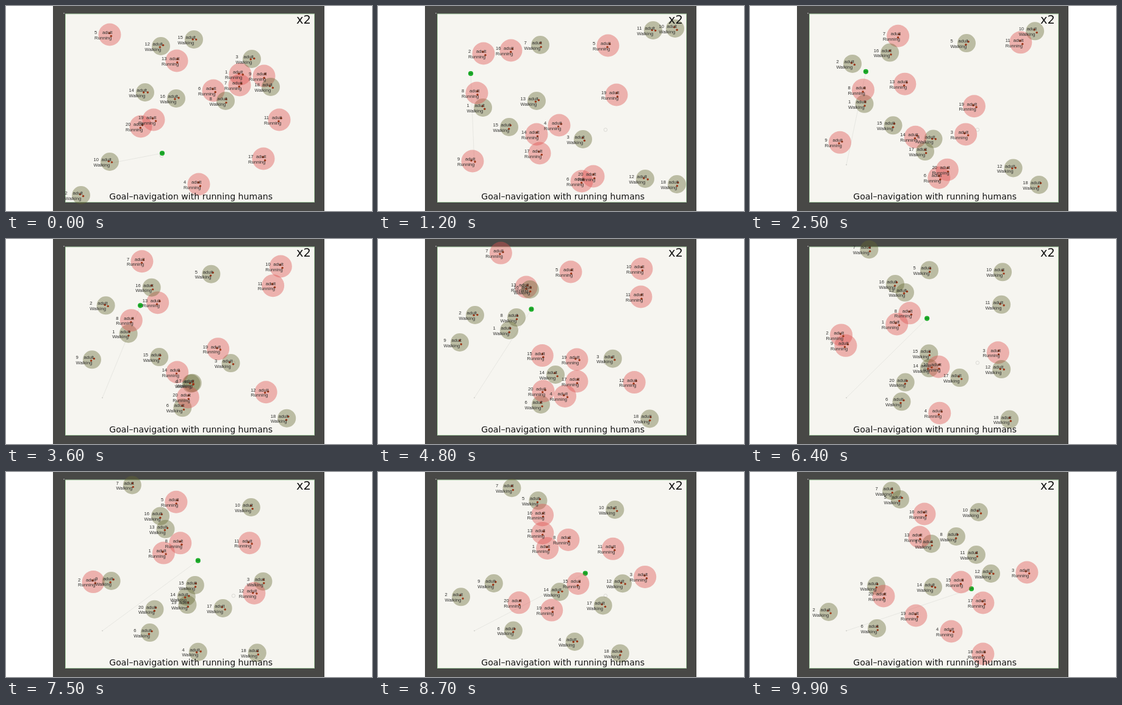
These frames come from a looping animation (600 px wide and 337 px high, 10000 ms). An HTML page with a canvas:

```html
<!DOCTYPE html>
<html lang="en">
<head>
<meta charset="utf-8">
<title>Goal-navigation with running humans</title>
<style>
html, body { margin: 0; width: 100%; height: 100%; overflow: hidden; background: #fff; }
canvas { display: block; width: 600px; height: 337px; }
</style>
</head>
<body>
<canvas id="stage"></canvas>
<script>
const W = 600, H = 337, LOOP = 10000, STEP = 100;
const CUT = 300; // the second run begins here
const BEGIN = 1200, MIDDLE = 4800, END = 9900;
const MOODS = [BEGIN, 2500, MIDDLE, 6400, 7500, END];
const HOME = { x: 158, y: 261 };
const KINDS = {
  R: { r: 18.5, left: 25, fill: 'rgba(222,82,80,0.42)', word: 'Running' },
  W: { r: 15, left: 26.5, fill: 'rgba(101,102,47,0.4)', word: 'Walking' }
};

const canvas = document.getElementById('stage');
const ctx = canvas.getContext('2d');
const ratio = window.devicePixelRatio || 1;
canvas.width = W * ratio;
canvas.height = H * ratio;
ctx.scale(ratio, ratio);

const lerp = (a, b, u) => a + (b - a) * u;
const point = (x, y, t) => ({ x, y, t });

// Each agent stands at `spot` in the first run, then goes straight from
// `from` to `to`, changing course at any bends on the way.
// moods: one letter for the first run, then one per time in MOODS.
const agents = [];
function agent(moods, spot, from, to, ...bends) {
  const path = [
    point(...from, BEGIN),
    ...bends.map(([x, y, t = MIDDLE]) => point(x, y, t)),
    point(...to, END)
  ];
  agents.push({ id: agents.length + 1, moods, spot: point(...spot), path });
}

agent('RWWWRRW', [384, 112], [172, 167], [297, 118], [215, 150]);
agent('WRWWRRW', [123, 311], [173, 78], [129, 230], [159, 125]);
agent('WWRWRWR', [403, 87], [336, 219], [454, 165]);
agent('RWRRWWR'.replace('RWRRWWR', 'RRWRRWR'), [316, 293], [297, 196], [330, 262], [313, 300, 7200]);
agent('RRWRWRW', [170, 47], [377, 65], [246, 45], [316, 54]);
agent('RRRWWWW', [340, 139], [334, 288], [208, 257], [267, 272]);
agent('RWRRWWW', [383, 130], [266, 64], [232, 31], [187, 14, 5600]);
agent('WRRWRRW', [360, 156], [162, 143], [338, 106], [227, 129]);
agent('RRRWRWW', [423, 115], [155, 255], [207, 187], [134, 170]);
agent('WWWRWWW', [170, 256], [487, 37], [375, 66], [432, 49]);
agent('RWRRWRW', [448, 187], [451, 40], [371, 136], [431, 95]);
agent('WWWRWRW', [254, 66], [438, 284], [395, 167]);
agent('RWRRWWR', [280, 90], [260, 156], [278, 107], [243, 79]);
agent('WRRWWWW', [228, 142], [260, 211], [300, 189], [291, 223]);
agent('WWWRWWR', [308, 55], [215, 199], [346, 181]);
agent('WRWWWWR', [279, 152], [218, 73], [286, 69], [249, 83], [238, 74, 6400]);
agent('RRWRWWR', [422, 251], [265, 242], [382, 215], [326, 234]);
agent('WWWWWWR', [434, 133], [490, 293], [382, 299]);
agent('RRRRRWR', [242, 187], [391, 146], [272, 236], [326, 198]);
agent('RRRRWWR', [221, 198], [353, 280], [219, 204], [271, 250]);

// The last entry of `list` already reached at t, leaving one after it.
function leg(list, t) {
  let i = 0;
  while (i < list.length - 2 && t >= list[i + 1]) i++;
  return { i, u: (t - list[i]) / (list[i + 1] - list[i]) };
}

function kindAt(a, t) {
  if (t < CUT) return KINDS[a.moods[0]];
  const { i, u } = leg(MOODS, t);
  const turn = 0.35 + 0.3 * ((a.id * 7) % 10) / 10;
  return KINDS[a.moods[u < turn ? i + 1 : i + 2]];
}

function pose(a, t) {
  const kind = kindAt(a, t);
  if (t < CUT) return { id: a.id, kind, x: a.spot.x, y: a.spot.y, heading: a.id * 2.4 };
  const { i, u } = leg(a.path.map(p => p.t), t);
  const p = a.path[i], q = a.path[i + 1];
  return {
    id: a.id, kind,
    x: lerp(p.x, q.x, u),
    y: lerp(p.y, q.y, u),
    heading: Math.atan2(q.y - p.y, q.x - p.x)
  };
}

// The robot sweeps along a shallow arc.
function robotAt(t) {
  const u = (t - BEGIN) / (END - BEGIN), bulge = u * (1 - u);
  return { x: lerp(152, 363, u) + 50 * bulge, y: lerp(111, 192, u) - 120 * bulge };
}

function disc(x, y, r, fill) {
  ctx.beginPath();
  ctx.arc(x, y, r, 0, Math.PI * 2);
  ctx.fillStyle = fill;
  ctx.fill();
}

function feet(p, t) {
  const stride = 2 * Math.sin(t / 170 + p.id * 1.9);
  const c = Math.cos(p.heading), s = Math.sin(p.heading);
  for (const side of [-1, 1]) {
    const f = stride * side, l = 2.7 * side;
    disc(p.x + 1 + f * c - l * s, p.y + f * s + l * c, 1.7, '#9c3516');
  }
}

function label(p) {
  const x = p.x - p.kind.left;
  ctx.fillText(p.id, x, p.y - 1);
  ctx.fillText('adult', x + 13, p.y - 1);
  ctx.fillText(p.kind.word, x, p.y + 7.7);
}

function arena() {
  ctx.fillStyle = '#fff';
  ctx.fillRect(0, 0, W, H);
  ctx.fillStyle = '#484846';
  ctx.fillRect(77, 0, 445, H);
  ctx.fillStyle = '#f6f5f0';
  ctx.fillRect(97, 13, 408.5, 309.5);
  ctx.strokeStyle = '#a9cfa6';
  ctx.lineWidth = 1;
  ctx.strokeRect(97.5, 13, 408, 309.5);
  disc(95, 12, 0.8, '#ddd');
}

function robot(t) {
  const early = t < CUT;
  const p = early ? { x: 256, y: 242 } : robotAt(t);
  const goal = early ? { x: 255, y: 246 } : { x: 373, y: 203.5 };
  ctx.strokeStyle = '#e3e2dd';
  ctx.lineWidth = 0.8;
  ctx.beginPath();
  ctx.moveTo(HOME.x, HOME.y);
  ctx.lineTo(p.x, p.y);
  ctx.stroke();
  disc(HOME.x, HOME.y, 0.9, '#cfcec9');
  ctx.strokeStyle = '#d3d2cd';
  ctx.beginPath();
  ctx.arc(goal.x, goal.y, 2.8, 0, Math.PI * 2);
  ctx.stroke();
  disc(p.x, p.y, 4.1, '#1fae2c');
  ctx.fillStyle = '#14801f';
  ctx.fillRect(p.x - 2.5, p.y - 0.8, 5, 1.2);
}

function draw(t) {
  arena();
  robot(t);
  const poses = agents.map(a => pose(a, t));
  for (const p of poses) disc(p.x, p.y, p.kind.r, p.kind.fill);
  for (const p of poses) feet(p, t);
  ctx.font = '7.6px "Liberation Sans", Arial, sans-serif';
  ctx.fillStyle = '#30302e';
  poses.forEach(label);
  ctx.fillStyle = '#141414';
  ctx.font = '14.1px "DejaVu Sans", sans-serif';
  ctx.fillText('Goal\u2013navigation with running humans', 169.3, 318.3);
  ctx.font = '19.5px "DejaVu Sans", sans-serif';
  ctx.fillText('x2', 476, 28.6);
}

const origin = performance.now();
function tick() {
  const t = (performance.now() - origin) % LOOP;
  draw(Math.floor(t / STEP) * STEP);
  requestAnimationFrame(tick);
}
tick();
</script>
</body>
</html>
```
